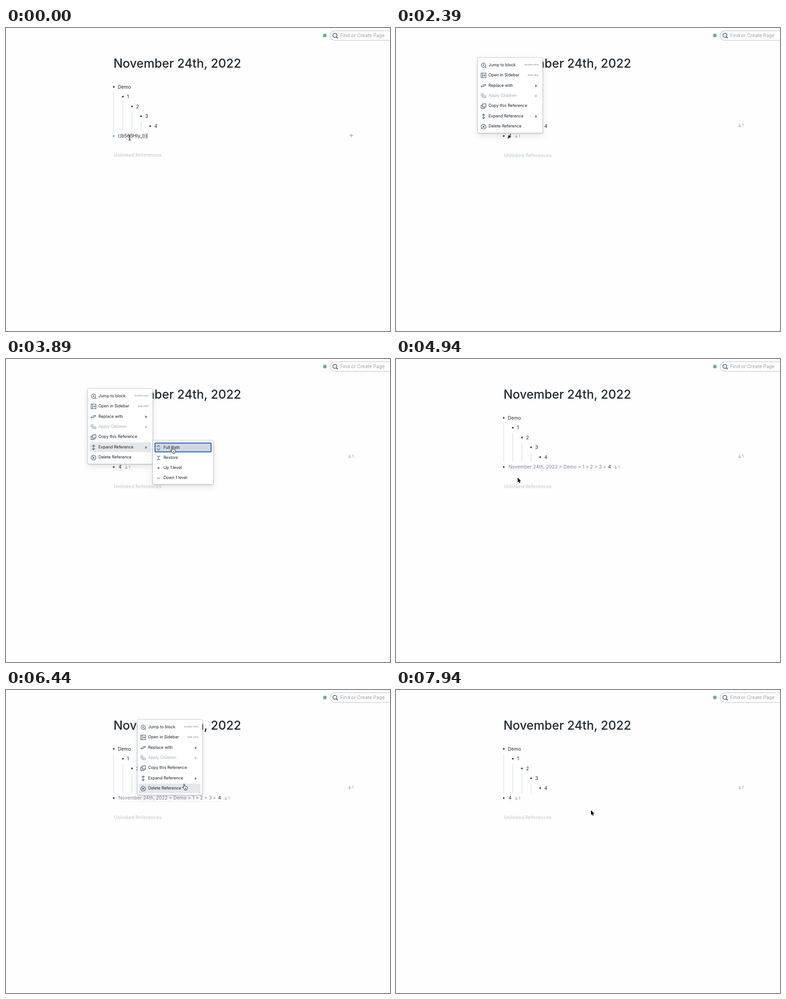
An HTML page for the animation above (8000 ms loop, 843 by 664 pixels).

```html
<!DOCTYPE html>
<html lang="en">
<head>
<meta charset="utf-8">
<title>Block reference menu</title>
<style>
html, body { margin: 0; width: 100%; height: 100%; overflow: hidden; background: #fefefe; }
svg { display: block; }
text { font: 10.4px Inter, sans-serif; font-optical-sizing: none; fill: #202b33; white-space: pre; }
.title { font-size: 26.74px; font-weight: 500; }
.muted { font-size: 8.2px; fill: #858b91; }
.faint { font-weight: 700; fill: #ced9e0; }
.item { font-size: 8.92px; fill: #182026; }
.off { fill: #a3adb5; }
.key { font: 5.94px "Liberation Sans", sans-serif; fill: #7f8b95; text-anchor: end; }
.panel { fill: #fff; stroke: rgba(16,22,26,.22); stroke-width: .8; }
.shadow { filter: drop-shadow(0 1.5px 1.5px rgba(16,22,26,.18)) drop-shadow(0 6px 7px rgba(16,22,26,.1)); }
.icon { fill: none; stroke: #5c7080; stroke-width: 1.4; }
.line { fill: none; stroke: #ced9e0; }
.arrow { fill: none; stroke: #858b91; stroke-width: .9; }
.hover { fill: #e4e8eb; stroke: #e4e8eb; stroke-width: 2; }
.active { fill: #d3d8dd; stroke: #1260c4; stroke-width: 2; }
</style>
</head>
<body>
<svg width="843" height="664" viewBox="0 0 843 664">
  <defs>
    <g id="count">
      <path class="arrow" d="M264 233.3v7M261 237.5l3 3 3-3"/>
      <text class="muted" x="269.3" y="240">1</text>
    </g>
  </defs>
  <circle id="status" cx="700" cy="16.5" r="4"/>
  <rect x="711.7" y="6.2" width="160" height="21" rx="10.5" fill="#fff" stroke="#c3cbd1" stroke-width="1.2"/>
  <g fill="none" stroke="#5c7080" stroke-width="1.8">
    <circle cx="722" cy="16" r="4.4"/><path d="M725 19.2l3.2 3.2" stroke-width="2.2"/>
  </g>
  <text x="733.6" y="20.3" fill-opacity=".45">Find or Create Page</text>
  <text class="title" x="235.9" y="87.4">November 24th, 2022</text>
  <g id="outline"></g>
  <g id="editing">
    <text x="245.6" y="240.2">((b563HIy_l))</text>
    <path d="M309.8 230.5v12" stroke="#202b33" stroke-width=".9"/>
    <path d="M758 231.5v8M754 235.5h8" stroke="#9ba5ad" stroke-width="1.3"/>
  </g>
  <g id="reference">
    <path id="underline" class="line" stroke-opacity=".45" stroke-width=".8"/>
    <text id="path" x="247" y="240.2" style="fill:#8a7f9f">November 24th, 2022 &gt; Demo &gt; 1 &gt; 2 &gt; 3 &gt;</text>
    <g id="tail"><text x="247" y="240.2">4</text><use href="#count"/></g>
    <use href="#count" x="490.5" y="-23.7"/>
  </g>
  <circle id="bullet" cx="236.5" cy="236.7" r="2"/>
  <text id="unlinked" class="faint" x="237">Unlinked References</text>
  <g id="menu"></g>
  <g id="cursor" stroke-linejoin="round">
    <path id="beam" d="M-3-5.5Q0-5.5 0-3.8Q0-5.5 3-5.5M0-4V4M-3 5.5Q0 5.5 0 3.8Q0 5.5 3 5.5M-1.3 1.8h2.6" fill="none" stroke="#222" stroke-width="1.1"/>
    <path id="pointer" d="M0 0V10.4L2.4 8.2 4 11.9 5.9 11.1 4.3 7.5H7.5Z" stroke="#fff" stroke-width="1.2" paint-order="stroke"/>
    <path id="alias" d="M7.5 .8V6.4L5.8 4.9Q3 6 3.2 9.4Q.8 5.6 3.8 3L2 1Z" stroke="#fff" stroke-width="1.2" paint-order="stroke"/>
    <path id="hand" d="M-1 7.3V1Q-1-.3 .1-.3T1.2 1V4.6Q1.4 3.6 2.4 3.8T3.4 5Q3.8 4.1 4.6 4.4T5.4 5.6Q6 4.9 6.6 5.4T7 7V9Q6.6 10.7 5.8 11.4V12.6H.6V11.4Q-1.4 9.5-3.4 7.2Q-4 6 -3 5.8T-1 7.3ZM2.2 8v2.4M3.8 8v2.4" fill="#fff" stroke="#111" stroke-width=".95"/>
  </g>
</svg>
<script>
const $ = id => document.getElementById(id);
const show = (id, on) => $(id).setAttribute('opacity', +on);
const move = (id, x, y = 0) => $(id).setAttribute('transform', `translate(${x} ${y})`);

$('outline').innerHTML = ['Demo', 1, 2, 3, 4].map((label, i) => {
  const x = 236.5 + 20 * i, y = 128.9 + 21.55 * i;
  return `<circle cx="${x}" cy="${y}" r="2" fill="#414950"/><text x="${x + 9}" y="${y + 3.6}">${label}</text>` +
    (i < 4 ? `<path class="line" d="M${x} ${y + 11.3}V226"/>` : '');
}).join('');

// Each item: label, icon path around its own centre, hint.
const ring = r => `M${-r} 0a${r} ${r} 0 1 0 ${2 * r} 0a${r} ${r} 0 1 0 ${-2 * r} 0`;
const main = {
  id: 'main', x: 179.3, y: 64.6, w: 142.8, h: 165.4, first: 80.4, pitch: 22.47, items: [
    ['Jump to block', ring(4.6) + 'M-2 0H2M0-2V2M3.2 3.2L6 6', 'double-click'],
    ['Open in Sidebar', 'M-5.3-5H5.3V5H-5.3ZM-2.2-5V5M-.5 0H4M1.8-2.2V2.2', 'shift-click'],
    ['Replace with', 'M-2-1.6H5M3.4-3L5.2-1.6 3.4-.2M2 1.6H-5M-3.4 .2L-5.2 1.6-3.4 3', '>'],
    ['Apply Children', 'M-5-4.5H-.8V-.8H-5ZM1-.2H5V4H1ZM-3-.8V2.5H1', '>'],
    ['Copy this Reference', 'M-2-5H5.3V2H-2ZM-2-2H-5.3V5H2V2', ''],
    ['Expand Reference', 'M0-5V5M-3.2-2.3L0-5.3 3.2-2.3M-3.2 2.3L0 5.3 3.2 2.3', '>'],
    ['Delete Reference', ring(5.2) + 'M-2.2-2.2L2.2 2.2M2.2-2.2L-2.2 2.2', '']
  ]
};
const sub = {
  id: 'sub', x: 322, y: 178.2, w: 133.2, h: 96.2, first: 193.5, pitch: 22.25, items: [
    ['Full Path', 'M-3.4-1.8L0-5 3.4-1.8M-3.4 1.8L0 5 3.4 1.8', ''],
    ['Restore', 'M-3.4-4.8L0-1.4 3.4-4.8M-3.4 4.8L0 1.4 3.4 4.8', ''],
    ['Up 1 level', 'M-2.6 0H2.6M0-2.6V2.6', ''],
    ['Down 1 level', 'M-2.6 0H2.6', '']
  ]
};
const EXPAND = 5;

function itemMarkup([label, icon, hint], x, y) {
  const off = label === 'Apply Children';
  const caret = `<path d="M${x + 126.5} ${y - 2}l4 3.3-4 3.3z" fill="#5c7080" opacity="${off ? .5 : 1}"/>`;
  const key = `<text class="key" x="${x + 134}" y="${y + 2}">${hint}</text>`;
  return `<path class="icon" opacity="${off ? .55 : 1}" transform="translate(${x + 12.8} ${y + 1})" d="${icon}"/>` +
    `<text class="item${off ? ' off' : ''}" x="${x + 23.7}" y="${y + 3.2}">${label}</text>` +
    (hint === '>' ? caret : key);
}
$('menu').innerHTML = [main, sub].map(({ id, x, y, w, h, first, pitch, items }) =>
  `<g id="${id}"><rect class="panel shadow" x="${x}" y="${y}" width="${w}" height="${h}" rx="2"/>` +
  `<rect id="${id}Hover" x="${x + 5}" width="${w - 10}" height="19.4" rx="1"/>` +
  items.map((entry, i) => itemMarkup(entry, x, first + pitch * i)).join('') + '</g>').join('');

// The screen refreshes in steps; all times below count them.
const STEP = 150, EDIT_END = 4, SAVE_TIME = 2;
const visits = [
  { open: 13, sub: 20, pick: 26, dx: 0 },
  { open: 41, sub: 45, pick: 50, dx: 109 }
];
// Pointer moves: start, end, destination.
const moves = [
  [0, 4, 164, 275], [5, 10, 240, 239], [15, 20, 273, 197.5], [21, 23, 365, 194],
  [26, 30, 145, 270], [30, 33, 267, 260], [33, 38, 428, 238], [41, 43, 391, 206.5],
  [43, 47, 455, 195], [47, 48, 485.5, 214], [50, 53, 428, 263.5]
];
function pointerAt(n) {
  let px = 271.5, py = 240.5;
  for (const [start, end, x, y] of moves) {
    const f = Math.min(1, Math.max(0, (n - start) / (end - start)));
    const eased = f * f * (3 - 2 * f);
    px += (x - px) * eased;
    py += (y - py) * eased;
  }
  return [px, py];
}
function rowUnder({ x, w, first, pitch, items }, px, py) {
  const row = Math.round((py - first) / pitch);
  return px > x + 4 && px < x + w - 4 && row in items ? row : -1;
}
function highlight({ id, first, pitch }, row, pressed) {
  const rect = $(id + 'Hover');
  show(rect.id, row >= 0);
  rect.setAttribute('y', first + pitch * row - 9.3);
  rect.setAttribute('class', pressed ? 'active' : 'hover');
}
function draw(time) {
  const n = Math.floor((time % 8000 + 10) / STEP);
  const [px, py] = pointerAt(n);
  const visit = visits.find(({ open, pick }) => n >= open && n <= pick);
  const subOpen = !!visit && n >= visit.sub;
  const editing = n < EDIT_END;
  const expanded = n > visits[0].pick && n <= visits[1].pick;
  const saving = [EDIT_END, ...visits.map(v => v.pick + 1)].some(t => n >= t && n < t + SAVE_TIME);

  $('status').setAttribute('fill', saving ? '#d9a253' : '#65b38e');
  show('editing', editing);
  show('reference', !editing);
  $('bullet').setAttribute('fill', editing ? '#4fa8c4' : '#414950');
  $('unlinked').setAttribute('y', editing ? 282.3 : 283.2);

  const end = expanded ? 473 : 254.5;
  show('path', expanded);
  move('tail', end - 254.5);
  $('underline').setAttribute('d', `M247 244.3H${end}`);

  let mainRow = -1, subRow = -1;
  show('menu', visit ? (n === visit.open ? .6 : 1) : 0);
  show('sub', subOpen);
  if (visit) {
    move('menu', visit.dx);
    mainRow = rowUnder(main, px - visit.dx, py);
    if (subOpen) {
      subRow = rowUnder(sub, px - visit.dx, py);
      mainRow = EXPAND;
    }
    highlight(main, mainRow, false);
    highlight(sub, subRow, n === visit.pick);
  }

  const overText = px > 238 && px < end && py > 228 && py < 250;
  const shape = mainRow >= 0 ? 'hand' : editing && px > 238 ? 'beam' : overText ? 'alias' : 'pointer';
  move('cursor', px, py);
  for (const id of ['beam', 'pointer', 'alias', 'hand']) show(id, id === shape);
}
function tick() {
  draw(performance.now());
  requestAnimationFrame(tick);
}
tick();
</script>
</body>
</html>
```
